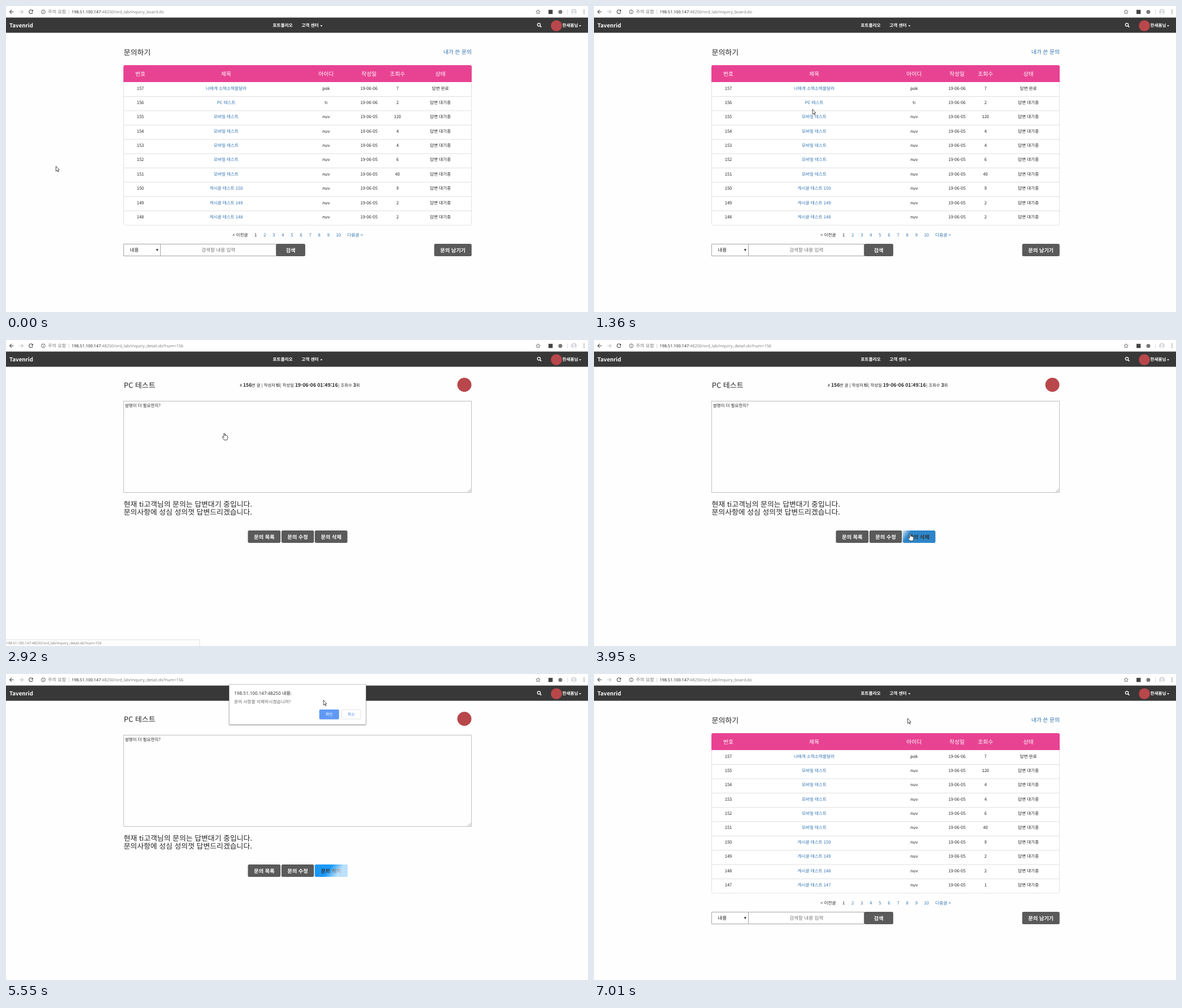
Animation of 1031x543 px, one loop 8.75 s. Source, as an HTML page:

```html
<!DOCTYPE html>
<html lang="ko">
<head>
<meta charset="utf-8">
<title>문의 게시판</title>
<style>
html, body { margin: 0; width: 100%; height: 100%; overflow: hidden; background: #fefefe; }
svg { display: block; }
text { font-family: "Noto Sans CJK KR", "Noto Sans", sans-serif; fill: #262626; text-rendering: geometricPrecision; }
.ui text, text.ui { font-family: "Open Sans", "Noto Sans CJK KR", sans-serif; }
.link { fill: #2d70b0; }
.link.over { fill: #23527c; text-decoration: underline; }
</style>
</head>
<body>
<svg id="stage" width="1031" height="543" viewBox="0 0 1031 543">
  <defs>
    <linearGradient id="glow">
      <stop offset="0" stop-color="#fff" stop-opacity="0"/>
      <stop offset=".4" stop-color="#fff" stop-opacity=".7"/>
      <stop offset=".75" stop-color="#fff" stop-opacity=".72"/>
      <stop offset="1" stop-color="#fff" stop-opacity="0"/>
    </linearGradient>
    <clipPath id="btnClip"><rect x="547" y="338" width="57.8" height="22" rx="2.5"/></clipPath>
    <filter id="shadow" x="-5%" y="-10%" width="110%" height="130%">
      <feDropShadow dx="0" dy="1" stdDeviation="1.2" flood-opacity=".35"/>
    </filter>
  </defs>
</svg>
<script>
const LOOP = 8750;
const HOST = '198.51.100.147', PORT = ':48250', DIR = '/ord_lab/';
const BOARD = 'inquiry_board.do', DETAIL = 'inquiry_detail.do?num=156';
const T = { hover: 2080, load: 2690, detail: 2890, btn: 3860, alert: 4220, ok: 5920, board: 6220 };
const stage = document.getElementById('stage');

function el(parent, tag, attrs = {}, content) {
  const node = document.createElementNS('http://www.w3.org/2000/svg', tag);
  for (const k in attrs) node.setAttribute(k, attrs[k]);
  if (content !== undefined) node.textContent = content;
  parent.appendChild(node);
  return node;
}
const group = (parent, attrs) => el(parent, 'g', attrs);
const rect = (p, x, y, width, height, fill, more) => el(p, 'rect', { x, y, width, height, fill, ...more });
const line = (p, d, stroke, w = 1, more) =>
  el(p, 'path', { d, stroke, fill: 'none', 'stroke-width': w, ...more });
const disc = (p, cx, cy, r, fill, more) => el(p, 'circle', { cx, cy, r, fill, ...more });
// y is the middle of the glyphs
const label = (p, x, y, str, size, more) =>
  el(p, 'text', { x, y: y + size * 0.365, 'font-size': size, ...more }, str);
const middle = (p, x, y, str, size, more) => label(p, x, y, str, size, { 'text-anchor': 'middle', ...more });
const heading = (p, x, y, str, size) => label(p, x, y, str, size, { 'font-weight': 500 });

function button(p, x, y, w, str) {
  const box = rect(p, x, y, w, 22, '#5a5a5a', { rx: 2.5 });
  const text = middle(p, x + w / 2, y + 11.5, str, 9.2, { 'font-weight': 700, style: 'fill:#fff' });
  return { box, text };
}

function makeBoard(rows) {
  const g = group(stage);
  const cols = [238, 390, 567, 643, 693.5, 769.5];
  heading(g, 208.5, 82, '문의하기', 12.95);
  label(g, 825, 81.7, '내가 쓴 문의', 9.75, { 'text-anchor': 'end', 'font-weight': 500, class: 'link' });
  rect(g, 208.5, 105.5, 616, 283.5, '#fff', { rx: 2.5, stroke: '#e2e2e2' });
  el(g, 'path', { d: 'M208 135V108q0-3 3-3H822q3 0 3 3V135Z', fill: '#e84393' });
  ['번호', '제목', '아이디', '작성일', '조회수', '상태'].forEach((s, i) =>
    middle(g, cols[i], 120.2, s, 9.75, { style: 'fill:#fff' }));
  const links = rows.map((row, r) => {
    const y = 145.8 + 25.38 * r;
    if (r < rows.length - 1) line(g, `M208.5 ${y + 14.7}H824.5`, '#dcdcdc', 0.9);
    const cells = row.map((s, c) => middle(g, cols[c], y, s, 7.6, c === 1 ? { class: 'link' } : {}));
    return { node: cells[1], y, half: row[1].length * 3.3 };
  });
  middle(g, 414.8, 406.5, '< 이전글', 7.6);
  for (let n = 1; n <= 10; n++)
    middle(g, 426 + 16.12 * n + (n > 9 ? 1.8 : 0), 406.5, n, 7.6, n > 1 ? { class: 'link' } : {});
  middle(g, 618.5, 406.5, '다음글 >', 7.6, { class: 'link' });
  rect(g, 208.5, 422.5, 65, 21, '#fff', { stroke: '#a5a5a5' });
  rect(g, 273.5, 422.5, 205, 21, '#fff', { stroke: '#a5a5a5' });
  label(g, 219.3, 433.2, '내용', 8.67);
  el(g, 'path', { d: 'M265.7 431.2h4.4l-2.2 4Z', fill: '#333' });
  middle(g, 376.3, 433.2, '검색할 내용 입력', 8.6, { style: 'fill:#757575' });
  button(g, 478.5, 421.9, 51.6, '검색');
  button(g, 758.5, 421.9, 66.3, '문의 남기기');
  return { g, links };
}

function makeDetail() {
  const g = group(stage);
  heading(g, 208.8, 80, 'PC 테스트', 12.95);
  [[414, '#'], [434.9, '번 글 | 작성자'], [485.6, '| 작성일'], [588.6, '| 조회수'], [620, '회']]
    .forEach(([x, s]) => label(g, x, 80.2, s, 7.4));
  [[420, '156'], [478.6, 'ti'], [512, '19-06-06 01:49:16'], [615, '3']]
    .forEach(([x, s]) => label(g, x, 79.8, s, 8.67, { 'font-weight': 700 }));
  disc(g, 812, 79.5, 12.5, '#b8474b');
  rect(g, 208.5, 108.5, 616, 162, '#fefefe', { stroke: '#b0b0b0', 'stroke-width': 0.8 });
  line(g, 'M818.5 269.5L823.5 264.5M821.3 269.5L823.5 267.3', '#777', 0.7);
  label(g, 210.5, 116, '설명이 더 필요한지?', 7.55);
  heading(g, 208.5, 291, '현재 ti고객님의 문의는 답변대기 중입니다.', 12.87);
  heading(g, 208.5, 305.2, '문의사항에 성심 성의껏 답변드리겠습니다.', 12.87);
  button(g, 428.5, 338, 57.8, '문의 목록');
  button(g, 488, 338, 57.5, '문의 수정');
  const remove = button(g, 547, 338, 57.8, '문의 삭제');
  const clip = group(g, { 'clip-path': 'url(#btnClip)' });
  const shine = rect(clip, 0, 0, 56, 24, 'url(#glow)');
  return { g, remove, shine };
}

function makeChrome() {
  const g = group(stage, { class: 'ui' });
  rect(g, 0, 0, 1031, 20.3, '#fff');
  line(g, 'M13.5 10.3H6.8M10 6.9L6.6 10.3L10 13.7', '#4a4a4a', 1.1);
  line(g, 'M23.5 10.3H30.2M27 6.9L30.4 10.3L27 13.7', '#c0c0c0', 1.1);
  const reload = group(g);
  line(reload, 'M47 8.2A3.4 3.4 0 1 0 47.4 11.3', '#4a4a4a', 1.1);
  el(reload, 'path', { d: 'M48 6.4V9.8H44.6Z', fill: '#4a4a4a' });
  const stop = line(g, 'M41 7.2L47.2 13.4M47.2 7.2L41 13.4', '#4a4a4a', 1.1);
  disc(g, 66, 10.3, 3.4, 'none', { stroke: '#555', 'stroke-width': 0.9 });
  line(g, 'M66 9.8V12.2M66 8.2V9', '#555', 0.9);
  label(g, 74.3, 10.4, '주의 요함', 8.2, { style: 'fill:#777' });
  line(g, 'M111.5 6.5V14.5', '#c8c8c8', 0.8);
  const url = el(g, 'text', { x: 116.3, y: 13, 'font-size': 7.32 });
  el(url, 'tspan', { fill: '#222' }, HOST);
  const path = el(url, 'tspan', { fill: '#777' });
  line(g, 'M942.6 6.6l1.1 2.4 2.6.3-1.9 1.8.5 2.6-2.3-1.3-2.3 1.3.5-2.6-1.9-1.8 2.6-.3Z', '#555', 0.8);
  rect(g, 961, 6.8, 7.4, 7.4, '#444');
  disc(g, 982, 10.4, 3.5, '#777');
  line(g, 'M994.5 6V15', '#d5d5d5', 0.8);
  disc(g, 1006, 10.3, 5, '#d4d7db');
  disc(g, 1006, 8.9, 1.7, '#fff');
  el(g, 'path', { d: 'M1002.8 13.2q3.2-3.6 6.4 0q-3.2 2.6-6.4 0Z', fill: '#fff' });
  [7.3, 10.3, 13.3].forEach(y => disc(g, 1024, y, 0.8, '#555'));
  return { reload, stop, path };
}

function makeNav() {
  const g = group(stage);
  const bold = { 'font-weight': 700, style: 'fill:#fff' };
  rect(g, 0, 20.3, 1031, 27.2, '#383838');
  label(g, 6, 34, 'Tavenrid', 9.75, bold);
  label(g, 472.6, 34.3, '포트폴리오', 7.65, bold);
  label(g, 523.6, 34.3, '고객 센터', 7.65, bold);
  el(g, 'path', { d: 'M556.5 34.3h4.2l-2.1 2.2Z', fill: '#fff' });
  disc(g, 944, 33.3, 2.6, 'none', { stroke: '#fff', 'stroke-width': 1.3 });
  line(g, 'M945.9 35.2L948.3 37.6', '#fff', 1.6);
  disc(g, 975, 35, 9.8, '#b8474b');
  label(g, 985.6, 34.3, '한새봄님', 7.6, bold);
  el(g, 'path', { d: 'M1014.9 34.3h4.2l-2.1 2.2Z', fill: '#fff' });
}

function makeStatus() {
  const g = group(stage, { class: 'ui' });
  rect(g, -1, 531.8, 344, 13, '#fdfdfd', { rx: 1.5, stroke: '#d8d8d8', 'stroke-width': 0.8 });
  label(g, 0, 538, HOST + PORT + DIR + DETAIL, 6.25, { style: 'fill:#777' });
  return g;
}

function makeAlert() {
  const g = group(stage, { class: 'ui' });
  rect(g, 395.5, 18.5, 242, 71, '#fff', { stroke: '#bdbdbd', 'stroke-width': 0.8, filter: 'url(#shadow)' });
  label(g, 404.2, 33.8, HOST + PORT + ' 내용:', 8.1);
  label(g, 404.2, 49, '문의 사항을 삭제하시겠습니까?', 7.75, { style: 'fill:#666' });
  rect(g, 555, 63, 35, 17.4, '#6099f5', { rx: 1.8 });
  middle(g, 572.6, 71.6, '확인', 7, { style: 'fill:#fff' });
  rect(g, 594.6, 63.4, 34, 16.7, '#fff', { rx: 1.8, stroke: '#dadce0', 'stroke-width': 0.8 });
  middle(g, 611.6, 71.6, '취소', 7, { style: 'fill:#4a80e8' });
  return g;
}

function makeCursor() {
  const g = group(stage);
  const shape = d => el(g, 'path', {
    d, fill: '#fff', stroke: '#222', 'stroke-width': 0.8, 'stroke-linejoin': 'round' });
  return {
    g,
    arrow: shape('M.3 .3V9.2L2.3 7.4L3.8 10.5L5.1 9.9L3.7 6.9H6.2Z'),
    hand: shape('M-1 1Q0-.6 1 1V4.6Q2-.0 2.8 4.8Q3.8 4 4.5 5.2Q6 4.4 6 6.3V9Q5.8 11 4.8 12.4H-.4' +
      'Q-1.2 10.8-3.2 8.4Q-4.4 6.6-2.6 6.6L-1 8Z'),
    beam: line(g, 'M-1.7-4.5H1.7M0-4.5V4.5M-1.7 4.5H1.7', '#222', 0.9)
  };
}

const WAIT = '답변 대기중', MOBILE = '모바일 테스트';
const posts = [
  [157, '나에게 소떡소떡을달라', 'pok', '19-06-06', 7, '답변 완료'],
  [156, 'PC 테스트', 'ti', '19-06-06', 2, WAIT]
];
[120, 4, 4, 6, 40, 9, 2, 2, 1].forEach((views, i) => {
  const n = 155 - i;
  posts.push([n, n > 150 ? MOBILE : '게시글 테스트 ' + n, 'nuv', '19-06-05', views, WAIT]);
});

const before = makeBoard(posts.slice(0, 10));
const detail = makeDetail();
const after = makeBoard(posts.filter(p => p[0] !== 156));
makeNav();
const bar = makeChrome();
const status = makeStatus();
const dialog = makeAlert();
const cursor = makeCursor();

// time, x, y of the pointer tip
const track = [
  [0, 88.2, 284], [320, 88.2, 284], [680, 212, 279], [950, 345, 248], [1170, 404, 219],
  [1360, 386.7, 183], [1580, 394, 148], [1740, 392, 121], [1920, 390, 141], [2080, 387, 166],
  [2300, 386.7, 165], [2960, 386.7, 165], [3300, 430, 228], [3740, 538, 333], [3860, 557, 346],
  [3950, 560, 344], [4300, 559, 344], [4450, 551, 285], [4620, 543, 190], [4740, 556.7, 163],
  [4950, 564, 92], [5150, 568, 48], [5350, 567, 41], [5550, 562, 46], [5760, 563.2, 66],
  [6570, 563.2, 66], [7010, 555.3, 78.4], [LOOP, 555.3, 78.4]
];
const slope = (i, c) => (track[i + 1][c] - track[i][c]) / (track[i + 1][0] - track[i][0]);
function tangent(i, c) {
  if (i === 0 || i === track.length - 1) return 0;
  const a = slope(i - 1, c), b = slope(i, c);
  return a * b <= 0 ? 0 : 2 * a * b / (a + b);
}
function pointer(t) {
  let i = 0;
  while (i < track.length - 2 && t >= track[i + 1][0]) i++;
  const h = track[i + 1][0] - track[i][0], u = (t - track[i][0]) / h, v = 1 - u;
  return [1, 2].map(c =>
    (1 + 2 * u) * v * v * track[i][c] + u * u * (3 - 2 * u) * track[i + 1][c] +
    h * u * v * (v * tangent(i, c) - u * tangent(i + 1, c)));
}

const ramp = (t, a, b) => Math.min(1, Math.max(0, (t - a) / (b - a)));
const show = (node, on) => node.setAttribute('visibility', on ? 'visible' : 'hidden');
const mix = (a, b, k) => `rgb(${a.map((v, i) => Math.round(v + (b[i] - v) * k))})`;

function render(t) {
  const [x, y] = pointer(t);
  const onDetail = t >= T.detail && t < T.board;
  const within = (a, b) => t >= a && t < b;
  show(before.g, t < T.detail);
  show(detail.g, onDetail);
  show(after.g, t >= T.board);

  const loading = within(T.load, T.detail) || within(T.ok, T.board);
  show(bar.stop, loading);
  show(bar.reload, !loading);
  bar.path.textContent = PORT + DIR + (within(T.load, T.ok) ? DETAIL : BOARD);
  status.setAttribute('opacity', ramp(t, 2130, 2250) * (1 - ramp(t, 3000, 3150)));
  show(dialog, within(T.alert, T.ok));

  let overLink = false;
  for (const l of before.links) {
    const over = t < T.detail && Math.abs(y - l.y) < 6.5 && Math.abs(x - 390) < l.half;
    l.node.classList.toggle('over', over);
    overLink = overLink || over;
  }

  const hot = t < T.ok ? ramp(t, T.btn, T.btn + 130) : 1 - 0.5 * ramp(t, T.ok, 6150);
  detail.remove.box.setAttribute('fill', mix([90, 90, 90], [26, 152, 248], hot));
  detail.remove.text.style.fill = t < T.btn ? '#fff' : '#333';
  const sx = 489 + 89 * ramp(t, T.btn + 20, T.alert);
  detail.shine.setAttribute('transform', `translate(${sx} 337) skewX(-35)`);
  show(detail.shine, onDetail && t >= T.btn);

  const hand = overLink || within(T.hover, 2980) || (within(T.btn - 40, T.ok) && y > 90);
  const beam = !hand && within(2980, 3800) && y > 109 && y < 270;
  show(cursor.hand, hand);
  show(cursor.beam, beam);
  show(cursor.arrow, !hand && !beam);
  cursor.g.setAttribute('transform', `translate(${x} ${y})`);
}

const start = performance.now();
function tick() {
  render((performance.now() - start) % LOOP);
  requestAnimationFrame(tick);
}
tick();
</script>
</body>
</html>
```
